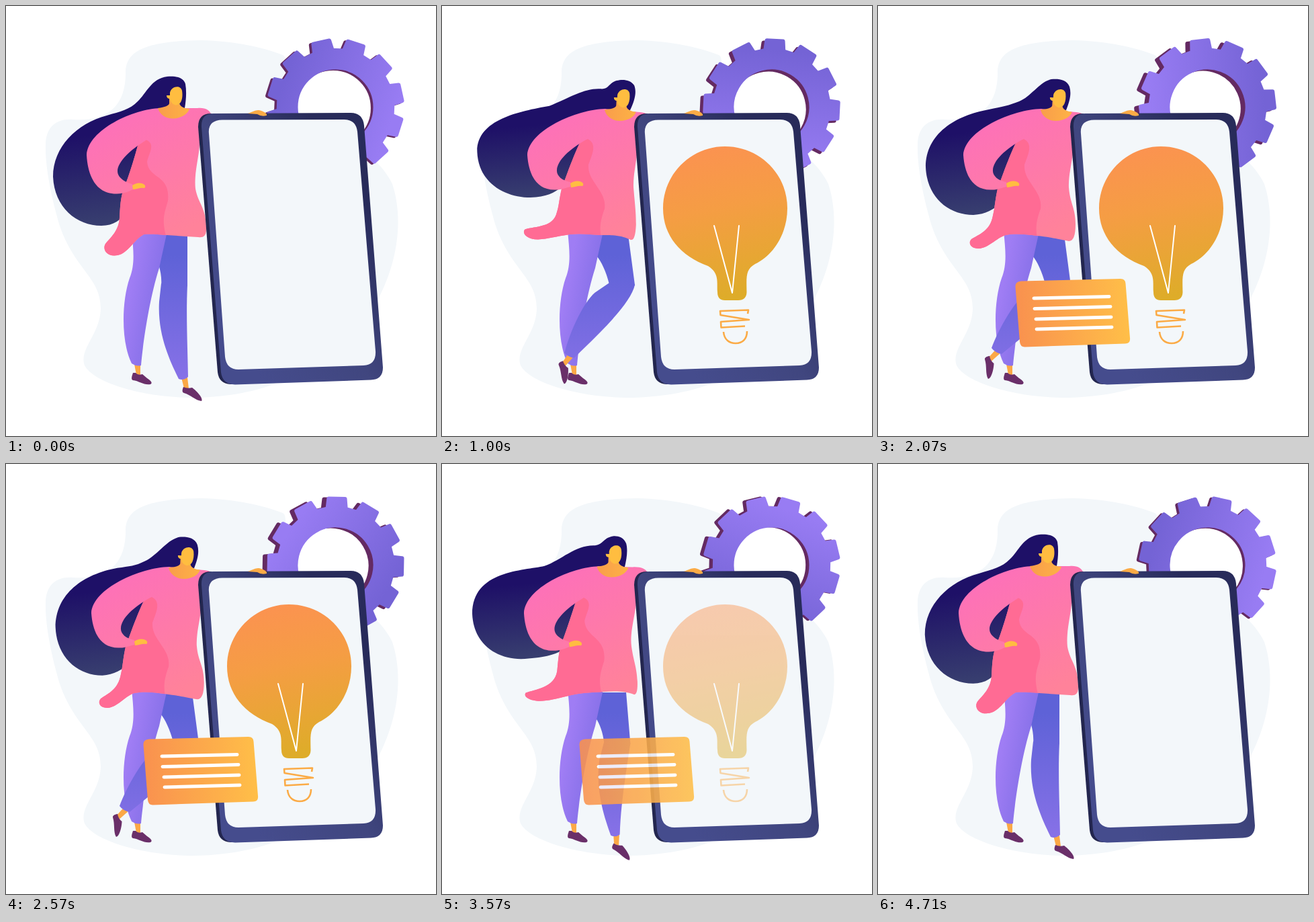
Write an HTML page that moves like this. It is 640 px wide and 640 px high and loops after 4.78 s.

```html
<!DOCTYPE html>
<html lang="en">
<head>
<meta charset="utf-8">
<title>Idea on a tablet</title>
<style>
html, body { margin: 0; height: 100%; overflow: hidden; background: #fff; }
svg { display: block; width: 100%; height: 100%; }
</style>
</head>
<body>
<svg viewBox="0 0 640 640">
  <defs>
    <linearGradient id="gearFill" gradientUnits="userSpaceOnUse" x1="-80" y1="-30" x2="80" y2="30">
      <stop stop-color="#7463d5"/><stop offset="1" stop-color="#987cf3"/>
    </linearGradient>
    <linearGradient id="hairFill" x1="0" y1="0" x2=".12" y2="1">
      <stop offset=".42" stop-color="#1e1067"/><stop offset="1" stop-color="#373d6f"/>
    </linearGradient>
    <linearGradient id="pink" gradientUnits="userSpaceOnUse" x1="180" y1="165" x2="265" y2="335">
      <stop stop-color="#fd71b8"/><stop offset="1" stop-color="#ff829a"/>
    </linearGradient>
    <linearGradient id="frontLeg" gradientUnits="userSpaceOnUse" x1="185" y1="420" x2="240" y2="430">
      <stop stop-color="#9f7df4"/><stop offset="1" stop-color="#806de5"/>
    </linearGradient>
    <linearGradient id="backLeg" gradientUnits="userSpaceOnUse" x1="0" y1="370" x2="0" y2="555">
      <stop stop-color="#5e62d7"/><stop offset="1" stop-color="#8771e7"/>
    </linearGradient>
    <linearGradient id="frame" gradientUnits="userSpaceOnUse" x1="330" y1="480" x2="560" y2="330">
      <stop stop-color="#454c8d"/><stop offset=".5" stop-color="#40467f"/><stop offset="1" stop-color="#282b5a"/>
    </linearGradient>
    <linearGradient id="bulbFill" gradientUnits="userSpaceOnUse" x1="400" y1="212" x2="445" y2="430">
      <stop stop-color="#fb9350"/><stop offset=".4" stop-color="#f59d44"/><stop offset="1" stop-color="#deac29"/>
    </linearGradient>
    <linearGradient id="cardFill">
      <stop stop-color="#f9914f"/><stop offset="1" stop-color="#ffbf48"/>
    </linearGradient>
    <linearGradient id="neckFill">
      <stop stop-color="#f99d4b"/><stop offset="1" stop-color="#fdb245"/>
    </linearGradient>
    <clipPath id="inDress"><use href="#dress"/></clipPath>
  </defs>

  <path fill="#f3f7fa" d="M178,100C178,70 200,52 290,51C340,52 385,62 412,73C425,79 400,140 425,190L530,215C550,228 566,246 575,265C590,310 587,375 552,440L400,562C370,575 320,583 275,583C200,582 130,560 117,535C108,510 140,490 141,450C141,400 95,390 75,310C64,270 58,230 59,205C60,180 75,167 100,169C150,172 178,150 178,100Z"/>

  <g fill-rule="evenodd" stroke-width="6" stroke-linejoin="round">
    <path id="gearBack" fill="#642a62" stroke="#642a62"/>
    <path id="gear" fill="url(#gearFill)" stroke="url(#gearFill)"/>
  </g>

  <path id="hair" fill="url(#hairFill)"/>
  <path id="thigh" fill="url(#backLeg)"/>
  <path fill="#fba846" d="M191,533H200V549H194Z"/>
  <path fill="#6a2f69" d="M189,546C187,552 186,556 189,557C198,558 206,565 215,563C219,561 215,557 210,554L203,548Q196,550 193,546Z"/>
  <path fill="url(#frontLeg)" d="M187,335C190,365 192,385 184,405C172,440 171,500 187,532Q194,537 201,535C203,510 212,440 228,390L240,335Z"/>
  <g id="foot">
    <path fill="#fba846" d="M-3,-2H6L8,14H1Z"/>
    <path fill="#6a2f69" d="M0,12C-2,17 -2,20 1,21C11,24 18,32 27,33C30,29 20,18 13,13Q6,15 0,12Z"/>
  </g>
  <path id="calf" fill="url(#backLeg)"/>

  <path id="dress" fill="url(#pink)"/>
  <path id="fold" fill="#ff6b94" clip-path="url(#inDress)"/>
  <path id="sleeve" fill="url(#pink)"/>
  <path id="hipHand" fill="#ffbd41" d="M188,267C194,263 202,262 207,267Q208,271 205,271C200,270 195,273 189,273Z"/>
  <g id="head">
    <path fill="url(#neckFill)" d="M243,136V145Q242,150 226,152C229,163 240,168 249,167.500C262,167 271,160 273,153Q259,152 258,144Z"/>
    <path fill="#ffbd40" d="M244,129C246,119 260,117 262,126C264,139 260,148 252,147.500Q245,145 244,138Q239,138 239,133L244,133Z"/>
  </g>

  <path fill="#23264f" d="M286,180Q286,160 305,160L330,170L345,563H334Q317,562 315,545Z"/>
  <path fill="url(#frame)" d="M291,180Q290,160 309,160L513,159Q531,159 533,178L561,538Q561,556 543,556.500L341,563.500Q322,563 320,545Z"/>
  <path fill="#f3f7fa" d="M302,190Q300,170 322,169.500L503,169Q521,169 523,187L550,514Q551,534 532,535L346,541Q328,541 326,522Z"/>
  <path fill="#fbab46" d="M360,160C368,157 374,153 380,156C386,158 389,161 388,163Q380,165 374,161Z"/>

  <g id="lamp" fill="none">
    <g id="bulb">
      <path fill="url(#bulbFill)" d="M410,426C409,410 413,398 396,387C355,372 329,342 329,301C329,250 371,209 421,209C473,209 514,250 514,301C514,340 492,372 466,384C452,392 453,402 453.500,426Q453,438 441,438H421Q410,438 410,426Z"/>
      <path stroke="#fff" stroke-width="2" stroke-linejoin="round" stroke-linecap="round" d="M405,327L432,427L442,327"/>
    </g>
    <g id="socket" stroke="#fbab46" stroke-width="2.600" stroke-linejoin="round" stroke-dasharray="1 2">
      <path pathLength="1" d="M455,458L456,452.500L414,454L414.500,460L457,467L415,470L415.500,478.500L451,476.500"/>
      <path pathLength="1" d="M419,485C420,497 428,502 437,502C448,502 454,495 454,484"/>
    </g>
  </g>

  <g id="card">
    <path fill="url(#cardFill)" d="M213,409.500L361,406Q368,406 368.500,413L375,494Q376,502 368,502.500L219,507.500Q212,508 211,500L204.500,418Q204,410 213,409.500Z"/>
    <path stroke="#fff" stroke-width="5" stroke-linecap="round" d="M232,435L344,432.500M233,450.500L346,447.500M235,466L347,463M236,481L348,478"/>
  </g>
</svg>

<script>
const LOOP = 4780;
const el = id => document.getElementById(id);
const set = (id, name, value) => el(id).setAttribute(name, value);

// Poses: "still" stands upright, "lean" rests on the tablet; Low and High are the ends of the swing.
const hair = {
  stillLow: "M266,152C268,140 269,128 267,116C264,105 250,104 240,105C216,108 209,130 196,142C185,154 170,157 150,163C105,175 70,210 70,254C72,300 105,327 142,327C160,327 172,318 180,305L215,215L240,160Z",
  stillHigh: "M268,154C270,140 271,128 269,118C266,107 255,105 248,106C232,109 230,122 216,125C190,128 172,148 150,155C120,163 48,165 48,232C50,275 80,299 118,299.5C150,298 170,293 180,285L215,215L240,160Z",
  leanLow: "M280,155C286,140 288,130 285,120C281,109 268,108 258,109C240,113 228,135 210,142C195,148 185,150 165,154C115,163 71,190 71,240C73,285 105,311 142,311C160,310 172,303 185,292L215,215L255,160Z",
  leanHigh: "M280,155C287,140 290,128 286,118C280,109 268,109 260,111C248,114 248,125 235,124C212,123 192,136 160,149C115,157 52,170 53,218C55,265 95,286 132,286C155,285 168,279 178,270L215,215L255,160Z"
};
const dress = {
  stillLow: "M228,152L285,152C297,151 303,155 306,162L288,190C291,215 279,245 282,272C286,295 299,300 298,335Q297,346 286,344C268,343 255,342 240,341C225,340 215,339 205,340C190,348 182,368 166,371C150,374 143,362 148,354C155,345 168,335 169,315C170,300 170,285 176,270C184,250 190,230 196,208Z",
  stillHigh: "M228,152L285,152C297,151 303,155 306,162L288,190C291,215 277,245 281,272C285,295 292,300 293,325Q294,341 288,342C275,338 258,338 240,339C225,340 205,341 190,346C170,352 160,359 145,358C130,356 127,350 130,346C140,340 168,335 171,310C172,295 172,285 176,270C184,250 190,230 196,208Z",
  leanLow: "M242,153L282,157C296,158 303,158 306,162L291,190C293,225 283,245 284,270C286,295 294,300 294,325Q294,350 284,350C265,346 255,344 237,342C220,340 205,338 190,341C175,346 165,360 150,361C137,361 134,352 139,347C150,340 167,335 171,312C174,300 174,290 178,272C186,250 195,225 204,206Z",
  leanHigh: "M242,153L282,157C296,158 303,158 306,162L291,190C293,225 284,245 285,270C287,295 289,305 289,325Q288,350 281,348C265,341 255,341 237,341C220,340 205,338 190,340C170,343 158,347 143,348C126,348 119,338 124,333C140,328 166,330 171,307C174,298 174,290 178,272C186,250 195,225 204,206Z"
};
const fold = [
  "M208,199C224,205 212,220 210,232C212,258 245,250 241,290C236,308 231,318 239,345L238,400L100,400L100,270L196,205Z",
  "M217,198C231,205 224,220 218,236C216,262 246,275 242,302C236,318 234,330 237,345L238,400L100,400L100,270L204,203Z"
];
const sleeve = [
  "M230,152C190,153 122,184 120,222C122,255 135,280 165,279.5C176,279 183,276 189,273L188,265C176,262 166,255 166,246C166,232 185,214 208,200L245,160Z",
  "M243,153C200,154 129,185 127,222C129,250 140,274 168,273.5C178,274 186,270 191,269L191,262C179,260 170,253 171,244C172,230 188,214 216,198L255,160Z"
];
// Back leg: standing, halfway, crossed behind.
const thigh = [
  "M225,340L270,340L270,417L231,417C232,405 230,395 228,388Z",
  "M225,340L277,340L288,417L249,415C245,395 238,380 230,372Z",
  "M225,340L277,340L287,416L249,414C244,395 237,380 230,372Z"
];
const calf = [
  "M270,415C268,460 270,500 271,552Q264,558 257,555C245,530 225,490 228,440L231,413Z",
  "M288,416C278,460 263,510 260,551Q254,555 247,551C238,520 230,480 239,440L249,412Z",
  "M287,414C282,440 230,480 184,518Q174,516 169,509C180,480 205,435 225,424L249,412Z"
];
const foot = ["264,555,0", "253,551,17", "176,514,56"];

const NUMBER = /-?[\d.]+/g;
function mix(a, b, k) {
  const to = b.match(NUMBER);
  let i = 0;
  return a.replace(NUMBER, v => (+v + (to[i++] - v) * k).toFixed(2));
}
const mixThree = (poses, k) => k < 1 ? mix(poses[0], poses[1], k) : mix(poses[1], poses[2], k - 1);
const ramp = (t, from, to) => Math.min(1, Math.max(0, (t - from) / (to - from)));
const ease = (t, from, to) => (1 - Math.cos(Math.PI * ramp(t, from, to))) / 2;
const easeOut = (t, from, to) => 1 - (1 - ramp(t, from, to)) ** 2;

function gearPath() {
  const polar = (r, deg) => {
    const a = deg * Math.PI / 180;
    return `${(r * Math.sin(a)).toFixed(2)},${(-r * Math.cos(a)).toFixed(2)}`;
  };
  const points = [];
  for (let a = 17.5; a < 377; a += 30)
    points.push(polar(85, a - 9.2), polar(99.5, a - 7), polar(99.5, a + 7), polar(85, a + 9.2));
  return `M${points.join("L")}ZM59,0A59,59 0 1 0 -59,0A59,59 0 1 0 59,0Z`;
}
set("gear", "d", gearPath());
set("gearBack", "d", gearPath());

const scaleAt = (x, y, k) => `translate(${x} ${y}) scale(${k}) translate(${-x} ${-y})`;

function draw(t) {
  const turn = 360 * t / LOOP;
  set("gear", "transform", `translate(490.5 150.5) rotate(${turn})`);
  set("gearBack", "transform", `translate(485.2 152) rotate(${turn}) translate(1.7 0)`);

  const swing = (1 - Math.cos(4 * Math.PI * t / LOOP)) / 2;
  const lean = ease(t, 0, 600) + 0.16 * ease(t, 2860, 3100) - 1.16 * ease(t, 3100, 3800);
  const body = shape => mix(
    mix(shape.stillLow, shape.stillHigh, swing / 0.808),
    mix(shape.leanLow, shape.leanHigh, (swing - 0.166) / 0.744),
    lean);
  set("hair", "d", body(hair));
  set("dress", "d", body(dress));
  set("fold", "d", mix(...fold, lean));
  set("sleeve", "d", mix(...sleeve, lean));
  set("hipHand", "transform", `translate(${3 * lean} ${-3 * lean})`);
  set("head", "transform", `translate(${16 * lean} ${3.5 * lean}) rotate(${3 * lean} 250 150)`);

  const step = 2 * (ease(t, 60, 1220) - ease(t, 2990, 3900));
  set("thigh", "d", mixThree(thigh, step));
  set("calf", "d", mixThree(calf, step));
  const [x, y, angle] = mixThree(foot, step).split(",");
  set("foot", "transform", `translate(${x} ${y}) rotate(${angle})`);

  set("bulb", "transform", scaleAt(432, 437, easeOut(t, 140, 854)));
  set("socket", "stroke-dashoffset", 1.01 * (1 - ramp(t, 70, 500)));
  set("lamp", "opacity", 1 - ramp(t, 3290, 3800));

  const size = 1.1 * easeOut(t, 1070, 1430) - 0.1 * ease(t, 1430, 1900);
  set("card", "transform", scaleAt(375, 502, size));
  set("card", "opacity", 1 - ramp(t, 3500, 4070));
}

function tick() {
  draw(performance.now() % LOOP);
  requestAnimationFrame(tick);
}
tick();
</script>
</body>
</html>
```
